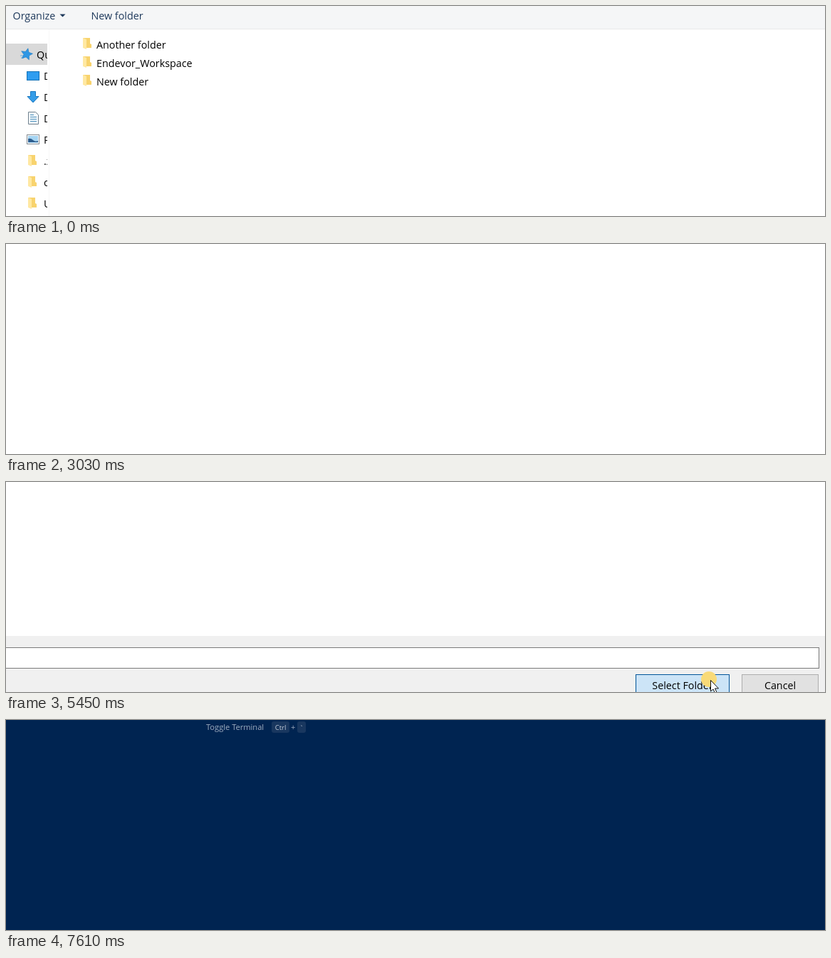
These frames come from a looping animation (1150x296 px, 7940 ms). An HTML page:

```html
<!DOCTYPE html>
<html lang="en">
<head>
<meta charset="utf-8">
<title>Folder picker</title>
<style>
html, body { margin: 0; width: 100%; height: 100%; overflow: hidden; background: #002451; }
svg { display: block; width: 1150px; height: 296px; }
text { font: 14.3px "Open Sans", "Noto Sans", sans-serif; fill: #000; white-space: pre; }
.bar { fill: #1e395b; }
.head { fill: #4c607a; }
.note { fill: #6d6d6d; }
.mid { text-anchor: middle; }
.hint { font-size: 11.1px; fill: #9fadc0; }
.key { font-size: 9.5px; fill: #c3ccd8; text-anchor: middle; }
.crisp { shape-rendering: crispEdges; }
</style>
</head>
<body>
<svg viewBox="0 0 1150 296">
  <defs>
    <clipPath id="sideClip"><rect x="-40" y="33" width="98" height="400"/></clipPath>
    <g id="folder">
      <path d="M0 1H10V9L12 10V15H0Z" fill="#f8d36e"/>
      <path d="M0 1 5 3V17L0 15Z" fill="#ffe8a2"/>
    </g>
  </defs>
  <g id="hint">
    <text class="hint" x="281" y="14">Toggle Terminal</text>
    <rect x="373" y="2" width="25" height="16" rx="3" fill="#19375f"/>
    <rect x="409" y="2" width="12" height="16" rx="3" fill="#19375f"/>
    <text class="key" x="385.500" y="14">Ctrl</text>
    <text class="hint" x="400" y="14">+</text>
    <text class="key" x="415" y="15">`</text>
  </g>
  <g id="dialog">
    <rect x="-20" y="-200" width="1183" height="620" fill="#fff"/>
    <g id="browser">
      <g class="crisp">
        <rect x="-20" y="-60" width="1240" height="92" fill="#f5f6f7"/>
        <rect x="-20" y="32" width="1240" height="1" fill="#e8e9ea"/>
        <rect x="60" y="33" width="1" height="400" fill="#f7f7f7"/>
      </g>
      <text class="bar" x="9.500" y="19">Organize</text>
      <path d="M75.500 11.500h8l-4 4z" fill="#1e395b"/>
      <text class="bar" x="119.500" y="19">New folder</text>
      <g id="side" clip-path="url(#sideClip)">
        <rect x="-20" y="53" width="78" height="30" fill="#d9d9d9"/>
        <path d="M20 70h5M21 73h4" stroke="#5aaee8"/>
        <path id="star" fill="#2f97e4" stroke="#1b78c0" stroke-width=".6"/>
        <rect x="29.500" y="92.500" width="17" height="12" fill="#2f9df0" stroke="#1272b8"/>
        <path d="M34.500 120.500h7v7h4.500l-8 8.500-8-8.500h4.500z" fill="#359de8" stroke="#1b78c0"/>
        <path d="M31.500 149.500h10l4 4v13h-14z" fill="#f4f9fc" stroke="#70808d"/>
        <path d="M34 153.500h5M34 156.500h9M34 159.500h9M34 162.500h9" stroke="#4289b8"/>
        <rect x="29.500" y="181.500" width="17" height="13" fill="#fff" stroke="#858c92"/>
        <rect x="31" y="183" width="14" height="10" fill="#a5d4f2"/>
        <path d="M31 187q4-1 7 2t7 1v2H31z" fill="#2d5d8e"/>
        <text x="43" y="74">Quick access</text>
      </g>
      <g id="list"></g>
      <g id="columns">
        <rect x="77.500" y="41.500" width="15" height="15" fill="#fff" stroke="#333"/>
        <path d="M235 38l4.500-4 4.500 4" fill="none" stroke="#666"/>
      </g>
      <text class="note" id="none" x="883" y="100">No items match your search.</text>
      <g id="frame" class="crisp">
        <rect x="56" y="0" width="1180" height="23" fill="#fff"/>
        <rect x="55" y="0" width="1" height="420" fill="#d4d4d4"/>
        <rect x="61" y="22" width="1" height="411" fill="#c9c9c9"/>
        <rect x="61" y="22" width="1180" height="1" fill="#c9c9c9"/>
        <rect x="1107" y="8" width="43" height="9" rx="2" fill="#7a2022"/>
      </g>
    </g>
    <rect id="edge" class="crisp" x="-20" width="1183" height="1" fill="#cbcbcb"/>
    <g id="footer">
      <rect x="-20" y="217" width="1183" height="160" fill="#f0f0f0"/>
      <rect x="-20.500" y="233.500" width="1162" height="29" fill="#fff" stroke="#7a7a7a"/>
      <rect id="select" x="884.500" y="271.500" width="131" height="30"/>
      <rect x="1033.500" y="271.500" width="107" height="30" fill="#e1e1e1" stroke="#adadad"/>
      <text class="mid" x="950" y="292">Select Folder</text>
      <text class="mid" x="1087" y="292">Cancel</text>
    </g>
  </g>
  <circle id="press" r="11" fill="#f9da78"/>
  <path id="cursor" d="M.5 .5V16L4 13 6.500 18.500 9 17.500 6.500 12H11.500Z" fill="#fff" stroke="#111"/>
</svg>
<script>
const LOOP = 7940;
const $ = id => document.getElementById(id);

function add(parent, tag, attrs, label) {
  const el = document.createElementNS("http://www.w3.org/2000/svg", tag);
  for (const k in attrs) el.setAttribute(k, attrs[k]);
  if (label) el.textContent = label;
  parent.append(el);
  return el;
}
const set = (id, attrs) => {
  for (const k in attrs) $(id).setAttribute(k, attrs[k]);
};
const show = (id, on) => { $(id).style.display = on ? "" : "none"; };
const shift = (id, x, y) => set(id, { transform: `translate(${x} ${y})` });
const within = (t, a, b) => t >= a && t < b;

const star = Array.from({ length: 10 }, (_, i) => {
  const a = i * Math.PI / 5 - 1.35, r = i % 2 ? 4 : 8.5;
  return [29 + r * Math.cos(a), 68 + r * Math.sin(a)];
});
set("star", { d: `M${star.join("L")}Z` });

["Desktop", "Downloads", "Documents", "Pictures", ".z", "c", "U", "L"].forEach((name, i) => {
  const y = 98 + i * 30;
  add($("side"), "text", { x: 53, y: y + 6 }, name);
  if (i > 3) add($("side"), "use", { href: "#folder", x: 31, y: y - 9 });
});

const rows = ["Another folder", "Endevor_Workspace", "New folder"].map((name, i) => {
  const y = 41 + i * 26;
  const back = add($("list"), "rect", { x: 81.5, y: y + .5, width: 183, height: 25 });
  add($("list"), "use", { href: "#folder", x: 108, y: y + 3 });
  add($("list"), "text", { x: 127, y: y + 19 }, name);
  return back;
});

let left = 98;
for (const [name, width] of [["Name", 304], ["Date modified", 180], ["Type", 150], ["Size", 100]]) {
  add($("columns"), "text", { class: "head", x: left + 8, y: 55 }, name);
  left += width;
  add($("columns"), "rect", { class: "crisp", x: left, y: 33, width: 1, height: 32, fill: "#e5e5e5" });
}

// Pointer moves: start, end, pictures, then a curve of from, bend, to
const moves = [
  [130, 860, 12, [1049, 284], [460, 210], [225, 81]],
  [930, 1130, 3, [225, 78], [225, 78], [225, 78]],
  [1930, 2000, 2, [288, 40], [324, 18], [360, -3]],
  [2560, 3310, 12, [407, -2], [400, -20], [395, -40]],
  [3370, 4100, 12, [365, -40], [339, -4], [456, 23]],
  [4500, 5250, 12, [457, 23], [720, 130], [989, 279]],
  [7120, 7610, 8, [1015, 262], [1330, 130], [340, -30]]
];

// Share of a move done, advancing one picture at a time
function progress([start, end, n], t) {
  const k = Math.min(1, Math.max(0, (t - start) / (end - start)));
  return Math.floor(k * (n - 1) + .001) / (n - 1);
}

function pointer(t) {
  const move = moves.findLast(m => t >= m[0]) || moves[0];
  const k = progress(move, t), [a, b, c] = move.slice(3);
  return [0, 1].map(i => Math.round((1 - k) ** 2 * a[i] + 2 * k * (1 - k) * b[i] + k * k * c[i]));
}

function draw(t) {
  const [x, y] = pointer(t);
  shift("cursor", x, y);
  show("cursor", within(t, 130, 7610));
  shift("press", x - 2, y - 1);
  show("press", within(t, 1060, 1130) || within(t, 2560, 2700) || within(t, 5330, 5520));

  const row = t < 930 ? 2 : 1;
  rows.forEach((back, i) => {
    const on = t >= 130 && x < 264 && i === row, picked = on && t >= 1060;
    back.setAttribute("fill", picked ? "#cce8ff" : on ? "#e5f3ff" : "none");
    back.setAttribute("stroke", picked ? "#99d1ff" : "none");
  });
  show("list", t < 1460);
  show("columns", t >= 1530);
  show("none", t >= 1730);

  // the window is dragged up, then its lower end rises into view
  const drag = progress(moves[3], t), rise = progress(moves[4], t);
  const dragged = t >= 2560;
  show("frame", dragged);
  show("browser", drag < .4);
  shift("browser", dragged ? -38 - 66 * drag : 0, dragged ? -13 - 520 * drag : 0);
  show("edge", within(rise, .36, .6));
  set("edge", { y: 1 + Math.round((5 / 11 - rise) * 22) });
  show("footer", dragged);
  shift("footer", 0, Math.round(79 * Math.min(1, 2 * (1 - rise))));

  const over = t > 4500 && x >= 884 && y >= 271, down = t >= 5330;
  set("select", {
    fill: down ? "#cce4f7" : over ? "#e5f1fb" : "#e1e1e1",
    stroke: down ? "#005499" : over ? "#0078d7" : "#adadad"
  });

  // closing: shrink and fade
  const gone = progress([5450, 5730, 5], t);
  const size = 1 - .04 * gone;
  show("dialog", gone < 1);
  set("dialog", {
    opacity: 1 - 1.56 * gone ** 2,
    transform: `translate(300 -130) scale(${size}) translate(-300 130)`
  });
  show("hint", t >= 6850);
}

const start = performance.now();
function tick() {
  draw((performance.now() - start) % LOOP);
  requestAnimationFrame(tick);
}
draw(0);
requestAnimationFrame(tick);
</script>
</body>
</html>
```
